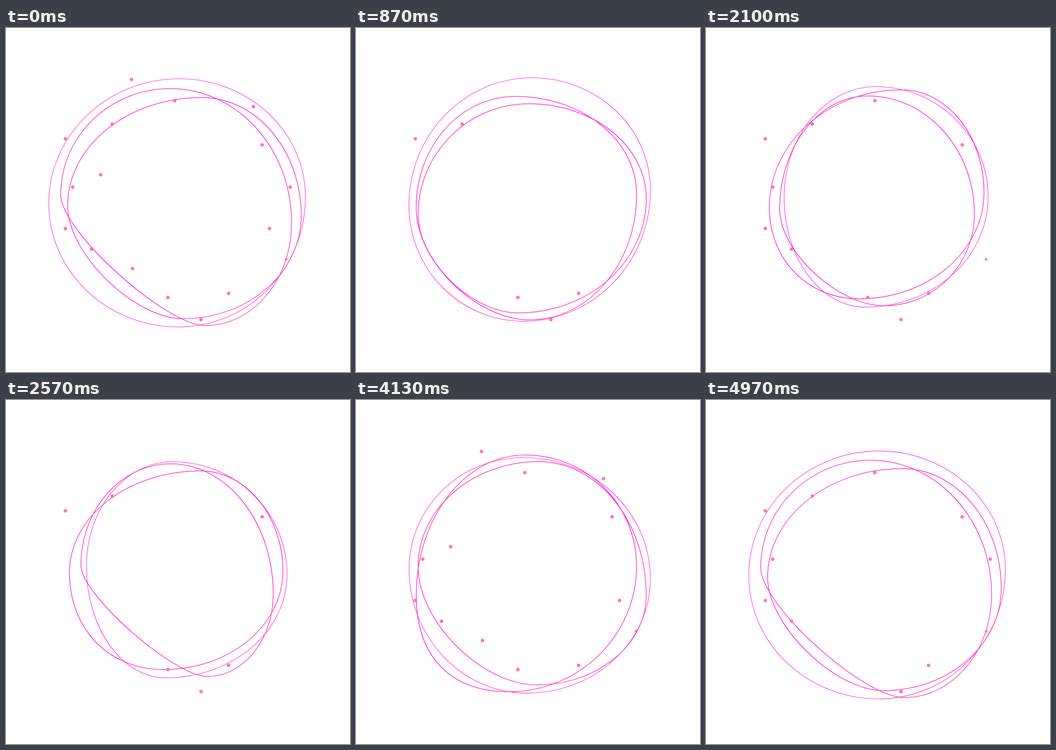
Write an HTML page with a canvas that moves like this. It is 748x748 px and loops after 5010 ms.

```html
<!DOCTYPE html>
<html lang="en">
<head>
<meta charset="utf-8">
<title>Morphing rings</title>
<style>
html, body { margin: 0; width: 100%; height: 100%; overflow: hidden; background: #fff; }
canvas { display: block; width: 748px; height: 748px; }
</style>
</head>
<body>
<canvas id="stage" width="748" height="748"></canvas>
<script>
const ctx = document.getElementById('stage').getContext('2d');
const LOOP = 5010, FLASH = 30, TAU = 2 * Math.PI;
const ROUND = 0.5523; // handle length of a quarter ellipse

// A value that swings around mid and is highest at the given part of the loop.
const wave = (mid, swing, peak, turns = 1) =>
  p => mid + swing * Math.cos(TAU * turns * (p - peak));

// All rings breathe out at the loop start; pinch is how far the left side moves.
// The waves slide each extreme point along its side.
const rings = [
  {
    width: 1.1, edge: '#ff40b8', middle: '#ff18f4',
    left: 134, right: 631, bottom: 627, pinch: 41, top: wave(122, 15, 0.61),
    leftY: wave(372, 14, 0.13), rightY: wave(373, 21, 0.71),
    topX: wave(370, 13, 0.16), bottomX: wave(361, 15, 0.95),
    flat: wave(0, 0, 0)
  },
  {
    width: 1.5, edge: '#ff5fa2', middle: '#ff14e0',
    left: 141, right: 601, bottom: 624, pinch: 22, top: wave(136, 17, 0.29),
    leftY: wave(391, 35, 0.3, 2), rightY: wave(384, 39, 0, 2),
    topX: wave(357, 12, 0.75), bottomX: wave(384, 57, 0.04, 2),
    flat: wave(0.1, 0.2, 0.04, 2)
  },
  {
    width: 1.5, edge: '#ff5fa2', middle: '#ff14e0',
    left: 136, right: 622, bottom: 609, pinch: 2, top: wave(150, 19, 0.12, 2),
    leftY: wave(382, 25, 0.22), rightY: wave(389, 36, 0.84),
    topX: wave(401, 28, 0.46, 2), bottomX: wave(363, 32, 0.87),
    flat: wave(0.05, 0.08, 0)
  }
];

// Each group of dots blinks a few turns per loop, lit between on and off.
const dotGroups = [
  { turns: 2, on: 0.5, off: 0.82, at: [[273, 112], [538, 171], [206, 319], [573, 436], [275, 523]] },
  { turns: 2, on: 0.5, off: 1, at: [[145, 346], [186, 481]] },
  { turns: 2, on: 0.5, off: 1.2, at: [[557, 254]] },
  { turns: 2, on: 0.82, off: 1.5, at: [[231, 209], [129, 241], [424, 634]] },
  { turns: 3, on: 0.8, off: 1.5, at: [[367, 158], [129, 436], [609, 503, 2.4]] },
  { turns: 3, on: 0.8, off: 1.2, at: [[618, 346]] },
  { turns: 3, on: 0.2, off: 0.9, at: [[352, 586]] },
  { turns: 1, on: 0, off: 1, at: [[484, 577]] }
];

function makeGradient({ edge, middle }) {
  const g = ctx.createLinearGradient(150, 120, 600, 630);
  g.addColorStop(0, edge);
  g.addColorStop(0.5, middle);
  g.addColorStop(1, edge);
  return g;
}
for (const ring of rings) ring.stroke = makeGradient(ring);

// Four rounded quarters joining the extreme points.
function drawRing(ring, p) {
  const breath = Math.cos(TAU * p);
  const left = [ring.left - ring.pinch * breath, ring.leftY(p)];
  const right = [ring.right + 20 * breath, ring.rightY(p)];
  const top = [ring.topX(p), ring.top(p)];
  const bottom = [ring.bottomX(p), ring.bottom + 23 * breath];

  // side is an extreme with an upright tangent, cap one with a level tangent
  function quarter(from, to, side, cap, k = ROUND) {
    const sideHandle = [side[0], side[1] + (cap[1] - side[1]) * k];
    const capHandle = [cap[0] + (side[0] - cap[0]) * k, cap[1]];
    const handles = from === side ? [sideHandle, capHandle] : [capHandle, sideHandle];
    ctx.bezierCurveTo(...handles[0], ...handles[1], ...to);
  }

  ctx.beginPath();
  ctx.moveTo(...top);
  quarter(top, right, right, top);
  quarter(right, bottom, right, bottom);
  quarter(bottom, left, left, bottom, ROUND - ring.flat(p));
  quarter(left, top, left, top);
  ctx.closePath();
  ctx.lineWidth = ring.width;
  ctx.strokeStyle = ring.stroke;
  ctx.stroke();
}

function drawDots(t) {
  ctx.fillStyle = '#ff7fa4';
  ctx.strokeStyle = '#ff3fae';
  ctx.lineWidth = 0.9;
  for (const { turns, on, off, at } of dotGroups) {
    const phase = turns * t / LOOP;
    const sinceOn = (phase - on + 1) % 1;
    if (t >= FLASH && sinceOn >= off - on) continue;
    for (const [x, y, r = 3.2] of at) {
      ctx.beginPath();
      ctx.arc(x, y, r, 0, TAU);
      ctx.fill();
      ctx.stroke();
    }
  }
}

const start = performance.now();
function frame() {
  const t = (performance.now() - start) % LOOP;
  ctx.clearRect(0, 0, 748, 748);
  for (const ring of rings) drawRing(ring, t / LOOP);
  drawDots(t);
  requestAnimationFrame(frame);
}
frame();
</script>
</body>
</html>
```
